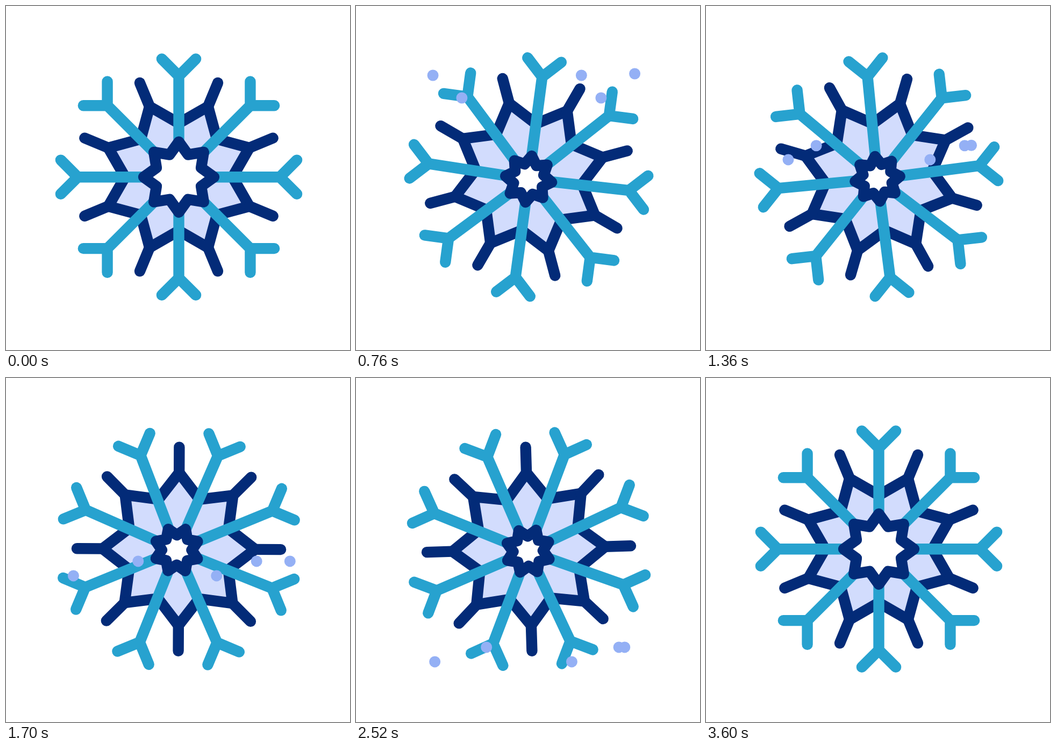
Write an HTML page with a canvas that moves like this. It is 640x640 px and loops after 3.62 s.

```html
<!DOCTYPE html>
<html lang="en">
<head>
<meta charset="utf-8">
<title>Snowflake</title>
<style>
  html, body { margin: 0; width: 100%; height: 100%; overflow: hidden; background: #fff; }
  canvas { display: block; width: 640px; height: 640px; }
</style>
</head>
<body>
<canvas id="stage" width="640" height="640"></canvas>
<script>
const ctx = document.getElementById('stage').getContext('2d');
const LOOP = 3620, END = 3600, BEAT = 900;
const BLUE = '#27a2cf', NAVY = '#032b78', PALE = '#d2dcfd', DOT = '#94b0f5';
const STEP = Math.PI / 8;
const SWING = [0, -40, 25, -30, 0]; // degrees at each beat

// Falling dots: drift and sway sideways; low and lift shift the fall.
const DOTS = [
  { x: 151,   drift: -1,  sway: 26,  phase: -0.31, low: 27, lift: 69 },
  { x: 189.5, drift: 62,  sway: -34, phase: -0.22, low: 0,  lift: 0 },
  { x: 423.5, drift: -20, sway: 26,  phase: -0.16, low: 27, lift: 69 },
  { x: 466.6, drift: 19,  sway: 11,  phase: -1.34, low: 0,  lift: 0 },
  { x: 503.5, drift: 2.5, sway: -24, phase: -0.68, low: 0,  lift: 45 }
];

const ramp = (a, b, t) => Math.max(0, Math.min(1, (t - a) / (b - a)));

function ease(a, b, t) {
  const u = ramp(a, b, t);
  return u * u * (3 - 2 * u);
}

function swing(t) {
  const i = Math.min(Math.floor(t / BEAT), SWING.length - 2);
  const turn = SWING[i] + (SWING[i + 1] - SWING[i]) * ease(i * BEAT, (i + 1) * BEAT, t);
  return turn * Math.PI / 180;
}

const polar = (r, a) => [r * Math.sin(a), -r * Math.cos(a)];

function star(outer, inner, turn, fill) {
  ctx.beginPath();
  for (let i = 0; i < 16; i++) ctx.lineTo(...polar(i % 2 ? inner : outer, turn + i * STEP));
  ctx.closePath();
  ctx.fillStyle = fill;
  ctx.fill();
  ctx.strokeStyle = NAVY;
  ctx.stroke();
}

// Eight copies of a set of lines, each a list of points for a given angle.
function arms(color, turn, lines) {
  ctx.strokeStyle = color;
  for (let i = 0; i < 8; i++) {
    ctx.beginPath();
    for (const [first, ...rest] of lines(turn + i * 2 * STEP)) {
      ctx.moveTo(...first);
      for (const p of rest) ctx.lineTo(...p);
    }
    ctx.stroke();
  }
}

function flake(t) {
  const shrink = ease(0, BEAT, t) - ease(3 * BEAT, END, t);
  const hub = [-2.8 * shrink, 3.1 * shrink];
  ctx.save();
  ctx.translate(321.5, 318.2);
  ctx.rotate(swing(t));
  ctx.lineWidth = 20.4;
  ctx.lineCap = ctx.lineJoin = 'round';

  star(142, 100, STEP, PALE);
  arms(NAVY, STEP, a => [[polar(142, a), polar(189.6, a)]]);
  arms(BLUE, 0, a => [
    [hub, polar(188, a)],
    [polar(221.9, a - 0.143), polar(188, a), polar(221.9, a + 0.143)]
  ]);

  ctx.translate(...hub);
  star(65.5 - 23.6 * shrink, 45 - 17.2 * shrink, 0, '#fff');
  ctx.restore();
}

function dots(t) {
  const fall = 60 + 0.146 * t + 73 * ease(1295, 2165, t);
  const early = 1 - ease(760, 1400, t);
  const u = (t - 760) / 2400, angle = (t - 760) / 1120 * 2 * Math.PI;
  ctx.globalAlpha = Math.min(ramp(280, 500, t), ramp(END, 3000, t));
  ctx.fillStyle = DOT;
  for (const { x, drift, sway, phase, low, lift } of DOTS) {
    ctx.beginPath();
    ctx.arc(x + drift * u + sway * Math.sin(angle + phase),
      fall + low - lift * early, 10.5, 0, 2 * Math.PI);
    ctx.fill();
  }
  ctx.globalAlpha = 1;
}

let start;
function draw(now) {
  start ??= now;
  const t = Math.min(Math.max(0, now - start) % LOOP, END);
  ctx.fillStyle = '#fff';
  ctx.fillRect(0, 0, 640, 640);
  flake(t);
  dots(t);
  requestAnimationFrame(draw);
}
requestAnimationFrame(draw);
</script>
</body>
</html>
```
